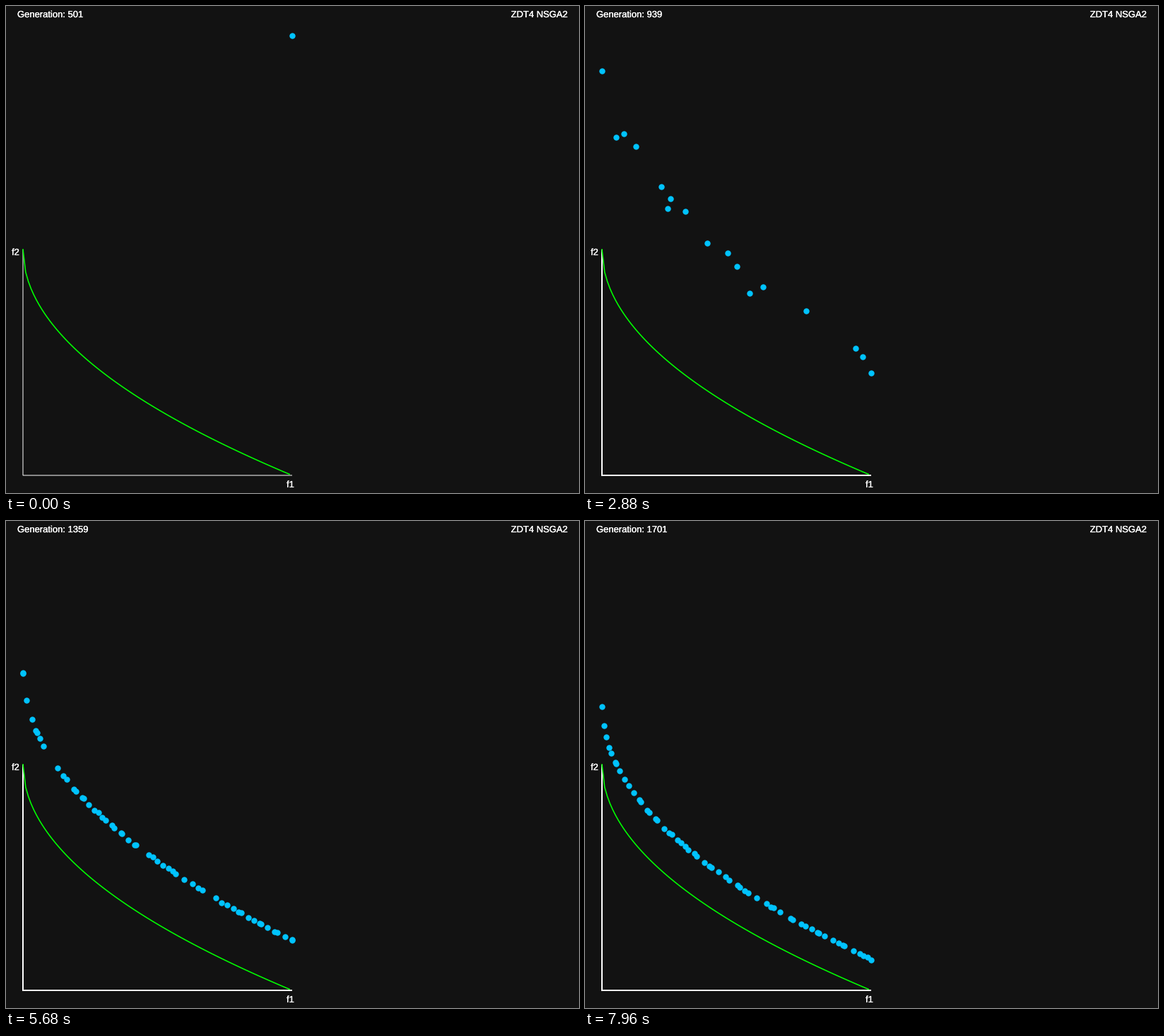
Animation, 811 px wide and 690 px high, one loop 8 s. Source, as a matplotlib script:

```python
import numpy as np
import matplotlib.pyplot as plt
from matplotlib.animation import FuncAnimation
from matplotlib.patheffects import withStroke

W, H, DPI = 811, 690, 64
FRAMES, STEP_MS = 200, 40
LEFT, BASE = 24, 665          # plot origin in pixels
SPAN_X, SPAN_Y = 381, 320     # pixels per unit of f1 and f2
PX = 72 / DPI                 # points per pixel

SLOTS = 60                    # largest size of the front
LIFE = 60                     # frames an individual keeps its f1
HOLD = 6                      # frames between two improvements of g

# Key points of the search: frame, g and size of the front
KEYS = np.array([
    (0, 3.93, 0), (21, 3.05, 18), (33, 2.85, 22), (63, 2.09, 18),
    (72, 1.79, 15), (84, 1.74, 25), (94, 1.635, 32), (119, 1.458, 40),
    (147, 1.395, 54), (164, 1.378, 60), (189, 1.27, 58), (199, 1.255, 56)])
KEY_FRAME, KEY_G, KEY_SIZE = KEYS.T

rng = np.random.default_rng(7)
lives = FRAMES // LIFE + 2
genes = ((np.arange(SLOTS) + rng.random((lives, SLOTS))) / SLOTS) ** 1.2
rank = rng.permutation(SLOTS)
age = rng.random(SLOTS)
delay = np.append(rng.uniform(0, HOLD, SLOTS), [0, 0])


def to_px(f1, f2):
    return LEFT + SPAN_X * f1, BASE - SPAN_Y * f2


def population(n):
    """Pixel positions of the front at frame n, with both extreme points."""
    life = (n / LIFE + age).astype(int)
    f1 = np.append(genes[life, np.arange(SLOTS)], [0, 1])
    held = np.floor((n + delay) / HOLD) * HOLD - delay
    held[-2:] = n
    g = np.interp(held, KEY_FRAME, KEY_G)
    alive = np.append(rank < np.interp(n, KEY_FRAME, KEY_SIZE), [True, True])
    return to_px(f1[alive], (g - np.sqrt(g * f1))[alive])


fig = plt.figure(figsize=(W / DPI, H / DPI), dpi=DPI, facecolor="#121212")
ax = fig.add_axes([0, 0, 1, 1])
ax.set_xlim(0, W)
ax.set_ylim(H, 0)
ax.axis("off")


def label(x, y, text, ha="left"):
    return ax.text(x, y, text, ha=ha, va="baseline", color="white",
                   family="Liberation Sans", size=13 * PX,
                   path_effects=[withStroke(linewidth=.3, foreground="white")])


axes_line, = ax.plot(*to_px(np.array([0, 0, 1]), np.array([1, 0, 0])),
                     color="white", solid_capstyle="butt",
                     solid_joinstyle="miter", snap=False)
f1_front = np.arange(100) / 100
ax.plot(*to_px(f1_front, 1 - np.sqrt(f1_front)), color="#00ff00",
        lw=1.6 * PX, snap=False)
dots, = ax.plot([], [], "o", color="#00c3ff", ms=8.4 * PX, mew=0, zorder=4,
                snap=False)

counter = label(16, 16, "")
label(795, 16, "ZDT4 NSGA2", "right")
label(8, 353, "f2")
label(397, 682, "f1")


def draw(n):
    generation = 507 + 6 * n if n else 501
    counter.set_text(f"Generation: {generation}")
    # The axes are drawn over themselves, so they thicken after the start
    axes_line.set_linewidth((2 if n else 1) * PX)
    dots.set_data(*population(n))
    return counter, axes_line, dots


anim = FuncAnimation(fig, draw, frames=FRAMES, interval=STEP_MS,
                     init_func=lambda: draw(0), repeat=True, repeat_delay=0)
plt.show()
```
